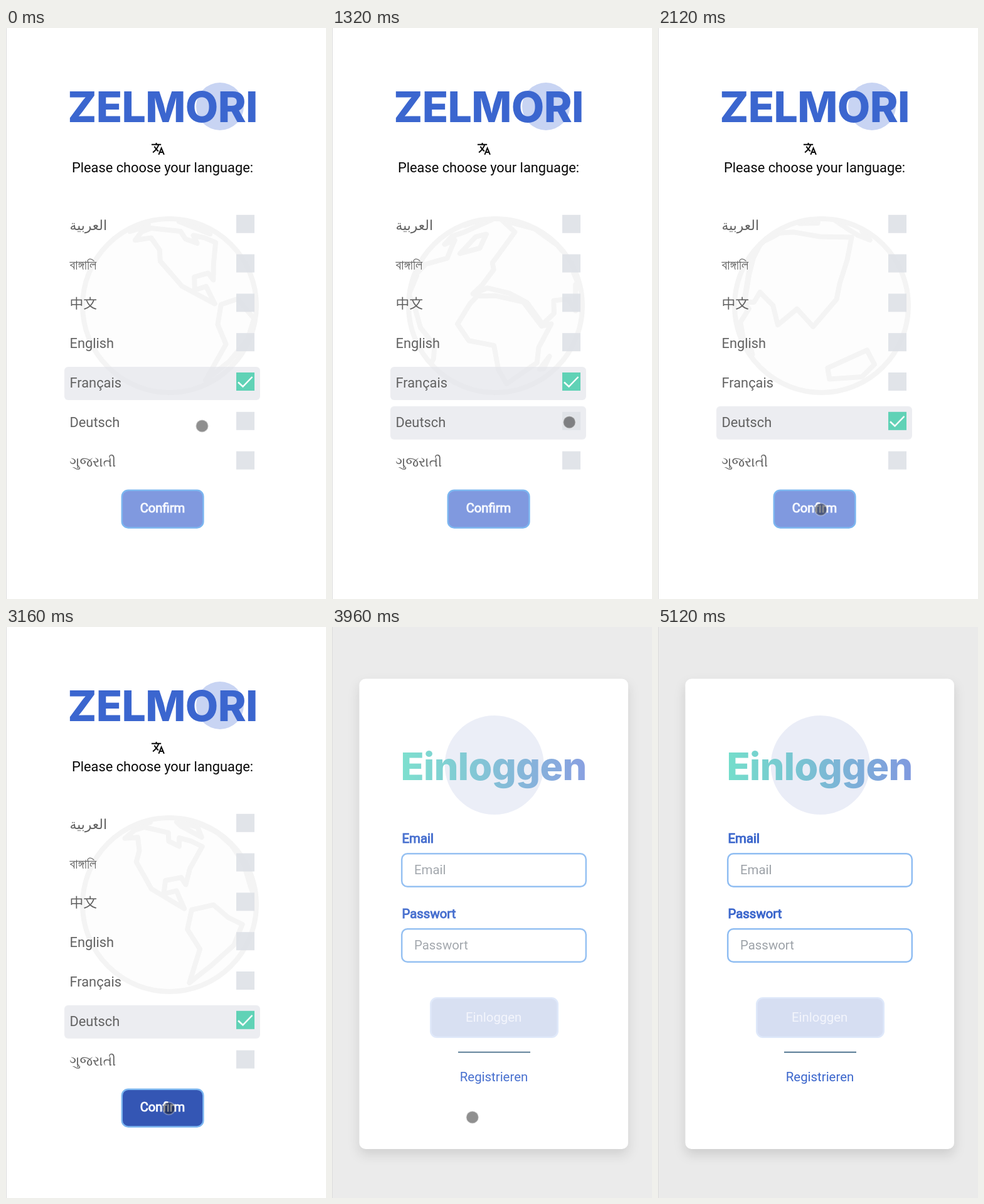
Write an HTML page that moves like this. It is 510 by 910 pixels and loops after 5640 ms.

```html
<!DOCTYPE html>
<html lang="en">
<head>
<meta charset="utf-8">
<title>Language choice</title>
<style>
  html, body { margin: 0; width: 100%; height: 100%; overflow: hidden; background: #fff; }
  svg { display: block; width: 100%; height: 100%; font: 20.4px Roboto, sans-serif; }

  .brand, .title { font-family: Inter, sans-serif; font-weight: 800; letter-spacing: -.01em; }
  .brand { font-size: 68px; fill: #3b66cf; }
  .title { font-size: 61px; fill: url(#mint); }
  .mid { text-anchor: middle; }
  .prompt { font-size: 21.8px; fill: #080808; }
  .row text { font-size: 21.8px; fill: #626262; }
  .row .box { fill: #dfe2e8; fill-opacity: .93; }
  .row .bar { fill: #e0e2e8; fill-opacity: .62; }
  .row .on { fill: #60d2b6; }
  .row path { fill: none; stroke: #fff; stroke-width: 2.5; }
  .globe { fill: none; stroke: #f4f4f4; stroke-width: 8; stroke-linecap: round; stroke-linejoin: round; }
  .heavy { stroke: currentColor; stroke-width: 1; fill: currentColor; }
  .label, .link { color: #3b66cc; fill: #3b66cc; }
  .field { fill: #fff; stroke: #8fbdf2; stroke-width: 2.5; }
  .hint { fill: #9da2a8; }
  .card { filter: drop-shadow(0 9px 9px rgba(0, 0, 0, .12)); }

  .list, .login, .press, .before, .after, .ok, .pointer {
    animation: 5640ms linear infinite both;
  }
  .list { animation-name: list; animation-timing-function: step-end; }
  .login { animation-name: login; }
  .press { animation-name: press; animation-timing-function: step-end; }
  .before { animation-name: before; animation-timing-function: step-end; }
  .after { animation-name: after; animation-timing-function: step-end; }
  .ok { animation-name: ok; }
  .pointer { animation-name: pointer; paint-order: stroke; }

  @keyframes list { 0% { opacity: 1 } 57.44%, 100% { opacity: 0 } }
  @keyframes login {
    0% { opacity: 0 }
    58.16% { opacity: 0; animation-timing-function: ease }
    75.89%, 100% { opacity: 1 }
  }
  @keyframes press { 0% { opacity: 0 } 21.27%, 100% { opacity: 1 } }
  @keyframes before { 0% { opacity: 1 } 24.82%, 100% { opacity: 0 } }
  @keyframes after { 0% { opacity: 0 } 24.82%, 100% { opacity: 1 } }
  @keyframes ok {
    0%, 54.2% { fill: #8099df }
    55.9%, 100% { fill: #3456b4 }
  }
  @keyframes pointer {
    0%, .7% { transform: translate(312.5px, 634.3px); animation-timing-function: ease-in-out }
    10.64% { transform: translate(380.5px, 567px); animation-timing-function: ease-in-out }
    19.86%, 25.53% { transform: translate(378.3px, 628.3px); animation-timing-function: ease-in }
    29.79% { transform: translate(359.5px, 644.5px) }
    32.62% { transform: translate(306px, 734px); animation-timing-function: ease-out }
    36.17% { transform: translate(262px, 774px) }
    37.59% { transform: translate(259.5px, 767.3px) }
    65.96% { transform: translate(259.5px, 767.3px); animation-timing-function: ease-in }
    70.21% { transform: translate(224.5px, 781.3px) }
    75.17% { transform: translate(34px, 788px); opacity: 1 }
    75.18%, 100% { transform: translate(34px, 788px); opacity: 0 }
  }
</style>
</head>
<body>
<svg viewBox="0 0 510 910">
  <defs>
    <linearGradient id="mint">
      <stop stop-color="#74decb"/>
      <stop offset=".5" stop-color="#7bbcd4"/>
      <stop offset="1" stop-color="#8099df"/>
    </linearGradient>
    <clipPath id="disc"><circle cx="260.5" cy="442.5" r="140"/></clipPath>
  </defs>

  <g class="list">
    <circle cx="341" cy="125" r="38" fill="#c8d4f3"/>
    <text class="brand mid" x="249.5" y="150">ZELMORI</text>
    <path transform="translate(231 181) scale(.95)" fill="none" stroke="#080808" stroke-width="2.1"
      d="M1 5H17M9 2V5M13 5Q11 12 3.3 18.3M5.7 8Q8 13 12.5 16.2M13 22 17.5 11 22 22M15 18h5"/>
    <text class="prompt mid" x="249.5" y="230">Please choose your language:</text>

    <circle cx="260.5" cy="442.5" r="138" fill="#fdfdfd"/>
    <g clip-path="url(#disc)"><path id="land" class="globe"/></g>
    <circle class="globe" cx="260.5" cy="442.5" r="138.5"/>
    <g id="rows"></g>

    <rect class="ok" x="184.8" y="736.8" width="129.6" height="59.6" rx="10" stroke="#7cb6f0" stroke-width="2.5"/>
    <text class="mid heavy" color="#f5f8ff" font-size="20.2" x="249.5" y="771.5">Confirm</text>
  </g>

  <g class="login">
    <rect width="510" height="910" fill="#eaeaea"/>
    <rect class="card" x="43.5" y="82.5" width="428.5" height="749.5" rx="10" fill="#fff"/>
    <circle cx="258.7" cy="220" r="79" fill="#eaedf7"/>
    <text class="title mid" x="257.5" y="244">Einloggen</text>
    <g id="fields"></g>
    <rect x="157.3" y="591.3" width="202.4" height="62.4" rx="10" fill="#d6def2" stroke="#dee8fa" stroke-width="2.6"/>
    <text class="mid" x="257.7" y="629" fill="#f3f5fc">Einloggen</text>
    <rect x="201" y="676.8" width="115" height="1.6" fill="#2b5878"/>
    <text class="mid link" x="258" y="724">Registrieren</text>
  </g>

  <rect width="1" height="910" fill="#dcdcdc"/>
  <circle class="pointer" r="9.6" fill="#000" fill-opacity=".44" stroke="#fff" stroke-opacity=".45" stroke-width="2"/>
</svg>

<script>
  const $ = id => document.getElementById(id);

  const bar = cls => `<rect class="bar ${cls}" x="93" y="-9" width="312" height="53" rx="6"/>`;
  const tick = cls => `<g class="${cls}"><rect class="on" x="367" width="29" height="29"/>
    <path d="M370 15.5 377.5 22.5 392.5 7"/></g>`;
  const names = ['العربية', 'বাঙ্গালি', '中文', 'English', 'Français', 'Deutsch', 'ગુજરાતી'];
  const extras = { 4: ['before', 'before'], 5: ['press', 'after'] };

  $('rows').innerHTML = names.map((name, i) => {
    const [shade, mark] = extras[i] || [];
    return `<g class="row" transform="translate(0 ${297.8 + 62.8 * i})">
      ${shade ? bar(shade) : ''}<rect class="box" x="367" width="29" height="29"/>
      ${mark ? tick(mark) : ''}<text x="101.5" y="24">${name}</text></g>`;
  }).join('');

  $('fields').innerHTML = ['Email', 'Passwort'].map((name, i) =>
    `<g transform="translate(0 ${120 * i})">
      <text class="label heavy" x="111.5" y="344">${name}</text>
      <rect class="field" x="111.2" y="361.2" width="293.6" height="52.6" rx="9"/>
      <text class="hint" x="131" y="394">${name}</text></g>`).join('');

  // Rough coastlines as longitude, latitude pairs.
  const coasts = [
    '-165 65 -156 71 -95 68 -94 59 -82 54 -79 62 -65 58 -55 52 -76 36 -81 25 -84 30 -96 28 -97 19 -88 21 -83 9 -106 22 -123 40 -125 49 -140 60 -160 56',
    '-78 8 -62 10 -50 0 -35 -7 -40 -21 -57 -36 -70 -54 -71 -20 -81 -5',
    '-17 15 -10 30 -5 36 10 37 32 31 43 12 51 11 40 -3 40 -16 19 -35 12 -17 9 3 -8 5',
    '-9 37 -2 44 8 55 6 60 25 71 105 77 178 68 140 54 125 38 121 28 104 10 92 21 79 8 73 20 58 25 55 17 44 13 35 30 22 38 3 42',
    '114 -22 142 -11 153 -27 146 -38 116 -34',
    '-45 60 -22 70 -50 83 -60 76',
    '44 -24 50 -14 48 -25'
  ].map(text => text.split(' ').map(Number));

  const rad = Math.PI / 180, loop = 5640;
  const turns = [[0, -115], [1320, 10], [1680, 43], [3160, 267], [loop, 600]];

  function spin(t) {
    const i = turns.findIndex(([at]) => at > t);
    const [t0, a] = turns[i - 1], [t1, b] = turns[i];
    return a + (b - a) * (t - t0) / (t1 - t0);
  }

  // The spin axis leans away from the poles, so the tilt sways with each turn.
  const lean = centre => (20 + 12 * Math.cos((centre - 40) * rad)) * rad;

  function project(lon, lat, centre) {
    const l = (lon - centre) * rad, p = lat * rad, tilt = lean(centre);
    const across = Math.cos(p) * Math.cos(l), up = Math.sin(p);
    return {
      x: 260.5 + 138 * Math.cos(p) * Math.sin(l),
      y: 442.5 - 138 * (Math.cos(tilt) * up - Math.sin(tilt) * across),
      front: Math.sin(tilt) * up + Math.cos(tilt) * across > 0
    };
  }

  const halfway = (a, b) => `${((a.x + b.x) / 2).toFixed(1)} ${((a.y + b.y) / 2).toFixed(1)}`;

  function coastPath(coast, centre) {
    const pts = [];
    for (let i = 0; i < coast.length; i += 2) pts.push(project(coast[i], coast[i + 1], centre));
    const n = pts.length;
    return pts.map((p, i) => p.front
      ? `M${halfway(pts[(i + n - 1) % n], p)}L${p.x.toFixed(1)} ${p.y.toFixed(1)} ${halfway(p, pts[(i + 1) % n])}`
      : '').join('');
  }

  let start;
  function draw(now) {
    start ??= now;
    const centre = spin((now - start) % loop);
    $('land').setAttribute('d', coasts.map(c => coastPath(c, centre)).join(''));
    requestAnimationFrame(draw);
  }
  requestAnimationFrame(draw);
</script>
</body>
</html>
```
